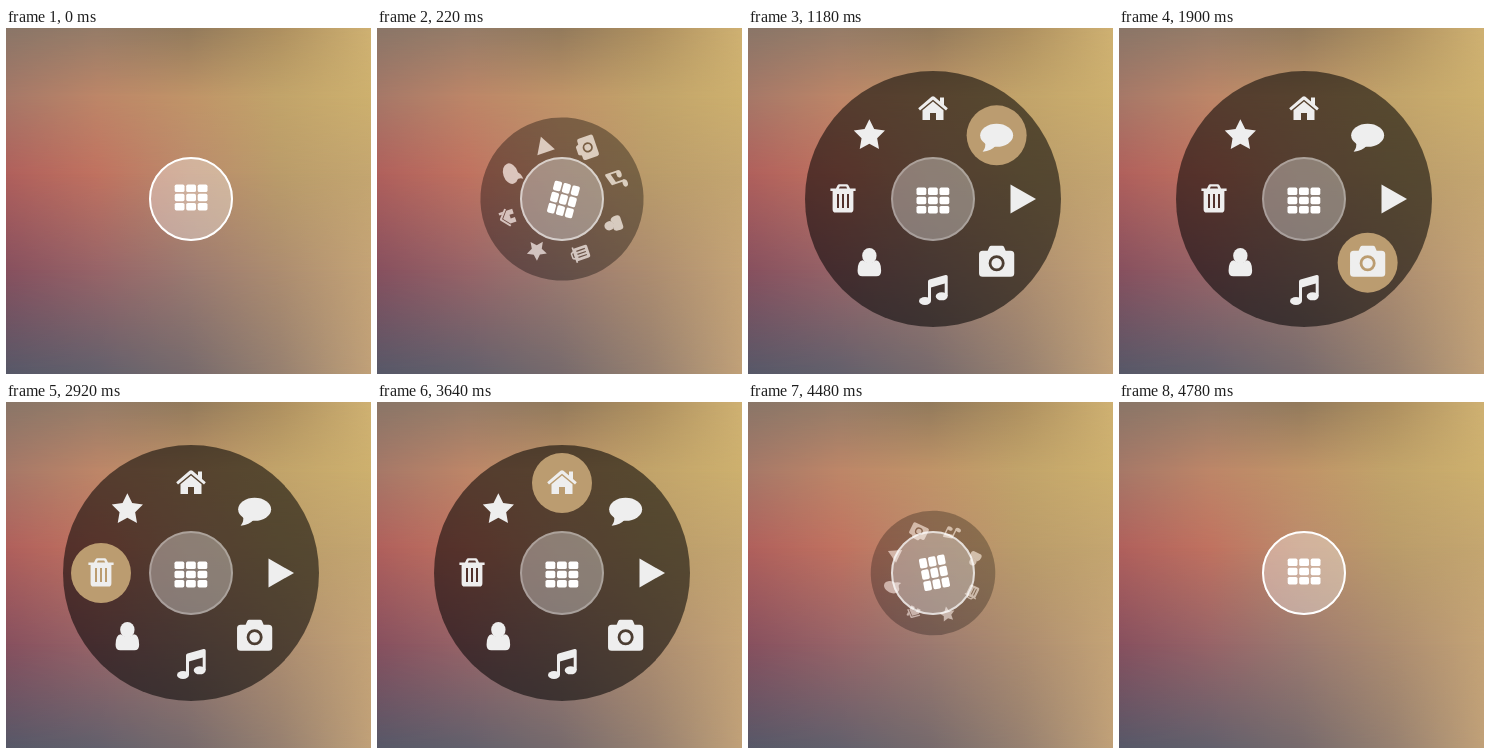
An HTML page that plays this animation: 365 by 346 pixels, repeating every 5.2 s.

```html
<!DOCTYPE html>
<html lang="en">
<head>
<meta charset="utf-8">
<title>Radial menu</title>
<style>
  html, body { margin: 0; width: 100%; height: 100%; overflow: hidden; }
  body { position: relative; background: #a98474; }
  .band, svg { position: absolute; inset: 0; width: 100%; height: 100%; }
</style>
</head>
<body>
<svg id="stage" viewBox="0 0 365 346">
  <g transform="translate(185 171)">
    <g id="wheel">
      <circle r="128" fill-opacity=".55"/>
      <circle id="spot" r="30" fill="#bb9c70"/>
      <g id="icons" fill="#eee" fill-rule="evenodd"></g>
    </g>
    <circle r="42" fill="#fff" fill-opacity=".33"/>
    <circle id="rim" r="41" fill="none" stroke="#fff" stroke-width="2"/>
    <g id="grid" fill="#fff"></g>
  </g>
</svg>
<script>
const $ = id => document.getElementById(id);

function add(parent, tag, attrs) {
  const el = document.createElementNS('http://www.w3.org/2000/svg', tag);
  for (const name in attrs) el.setAttribute(name, attrs[name]);
  return parent.appendChild(el);
}

// Backdrop: horizontal gradients, each fading in over the one above it
const bands = [
  [0, '#8a7668, #957c68, #927a5c, #ae9060, #cfb172'],
  [20, '#a67868, #bd8668, #c09468, #c2a46a, #cdb06e'],
  [42, '#b0605c, #c07260, #bb8b6c, #ba9c6a, #c4a670'],
  [70, '#87505f, #976468, #9c7a70, #ad8d70, #c4a376'],
  [100, '#565868, #62606c, #766a6c, #968070, #c0a078']
];
bands.forEach(([y, colors], i) => {
  const band = document.createElement('div');
  band.className = 'band';
  band.style.background = `linear-gradient(90deg, ${colors})`;
  if (i) band.style.maskImage = `linear-gradient(transparent ${bands[i - 1][0]}%, #000 ${y}%)`;
  document.body.insertBefore(band, $('stage'));
});

const oval = (x, y, rx, ry = rx) =>
  `M${x - rx} ${y}a${rx} ${ry} 0 1 0 ${2 * rx} 0a${rx} ${ry} 0 1 0 ${-2 * rx} 0Z`;
const slot = x => `M${x - 1} -5h2v14h-2Z`;
const star = 'M' + Array.from({ length: 10 }, (_, i) => {
  const r = i % 2 ? 8.2 : 16.4, a = i * Math.PI / 5;
  return `${r * Math.sin(a)} ${.3 - r * Math.cos(a)}`;
}).join('L') + 'Z';

// Clockwise from the top
const icons = [
  ['M-14.8 -.8L-1.5 -12.2Q0 -13.3 1.5 -12.2L14.8 -.8L13 1.6L0 -9.3L-13 1.6Z',
   'M-10.5 1.2L0 -7.5L10.5 1.2V11H3V4H-3V11H-10.5Z', 'M7 -11.5h4v8.2l-4 -3.7Z'],
  [oval(0, 0, 16.5, 11.5), 'M-12 5Q-10 12 -14 16.4Q-5 15.5 -1 10.5Z'],
  ['M-12.5 -14.5L13 0L-12.5 14.5Z'],
  ['M-14 -12h5l1.6 -3.6q.6 -1.4 2 -1.4h10.8q1.4 0 2 1.4l1.6 3.6h5q3.6 0 3.6 3.6v19q0 3.6 -3.6 3.6h-28' +
   'q-3.6 0 -3.6 -3.6v-19q0 -3.6 3.6 -3.6Z' + oval(0, .6, 8) + oval(0, .6, 5.2)],
  ['M-5 -7.5Q-5 -9 -3.5 -9.4L12.5 -14Q14.7 -14.4 14.7 -12.5V7H11.7V-5.5L-2 -1.4V12H-5Z',
   oval(-8, 12, 6, 4), oval(8.7, 7.3, 6, 4)],
  [oval(0, -6.8, 7.2, 7.8),
   'M-11.8 8Q-11.8 -1.8 -6.5 -2.4Q0 3 6.5 -2.4Q11.8 -1.8 11.8 8Q11.8 13.6 7 13.6H-7Q-11.8 13.6 -11.8 8Z'],
  ['M-12.6 -10.5h5.6l1.6 -3.2q.5 -1.1 1.7 -1.1h7.4q1.2 0 1.7 1.1l1.6 3.2h5.6v2.5h-2.2v18.2q0 3.4 -3 3.4h-14.8' +
   'q-3 0 -3 -3.4v-18.2h-2.2ZM-4.2 -10.5h8.4l-1 -2h-6.4Z' + slot(-5) + slot(0) + slot(5)],
  [star]
];

const places = icons.map((paths, i) => {
  const a = i * Math.PI / 4;
  const place = `translate(${90 * Math.sin(a)} ${-90 * Math.cos(a)})`;
  const icon = add($('icons'), 'g', { transform: place });
  paths.forEach(d => add(icon, 'path', { d }));
  return place;
});

for (let i = 0; i < 9; i++) {
  add($('grid'), 'rect', {
    x: -16.3 + i % 3 * 11.5, y: -14.5 + Math.floor(i / 3) * 9.2,
    width: 9.8, height: 7.6, rx: 1.7
  });
}

// [time, highlighted icon], -1 for none
const hovers = [
  [0, -1], [760, 0], [1120, -1], [1180, 1], [1480, -1], [1540, 2], [1900, 3], [2200, 4],
  [2560, 5], [2920, 6], [3220, -1], [3280, 7], [3640, 0], [4000, -1]
];

// cubic-bezier(.25, .1, .25, 1)
function ease(x) {
  if (x <= 0) return 0;
  if (x >= 1) return 1;
  const bez = (s, a, b) => 3 * s * (1 - s) ** 2 * a + 3 * s * s * (1 - s) * b + s ** 3;
  let lo = 0, hi = 1;
  for (let i = 0; i < 24; i++) {
    const mid = (lo + hi) / 2;
    if (bez(mid, .25, .25) < x) lo = mid; else hi = mid;
  }
  return bez(lo, .1, 1);
}

const LOOP = 5200, STEP = 60, FIRST = 100, MOVE = 400;

// 0 closed, 1 open
const phase = (t, opens, closes) => ease((t - opens) / MOVE) - ease((t - closes) / MOVE);

function draw(now) {
  const time = now % LOOP;
  const t = time < FIRST ? 0 : FIRST + Math.floor((time - FIRST) / STEP) * STEP;
  const wheel = phase(t, 72, 4360), button = phase(t, 85, 4350);
  const hover = hovers.filter(h => h[0] <= t).pop()[1];

  $('wheel').setAttribute('transform', `rotate(${-300 * (1 - wheel)}) scale(${wheel})`);
  $('wheel').setAttribute('opacity', wheel);
  $('grid').setAttribute('transform', `rotate(${180 * button})`);
  $('rim').setAttribute('stroke-opacity', 1 - .72 * button);
  $('spot').setAttribute('visibility', hover < 0 ? 'hidden' : 'visible');
  if (hover >= 0) $('spot').setAttribute('transform', places[hover]);
}

const start = performance.now();
function tick() {
  draw(performance.now() - start);
  requestAnimationFrame(tick);
}
tick();
</script>
</body>
</html>
```
